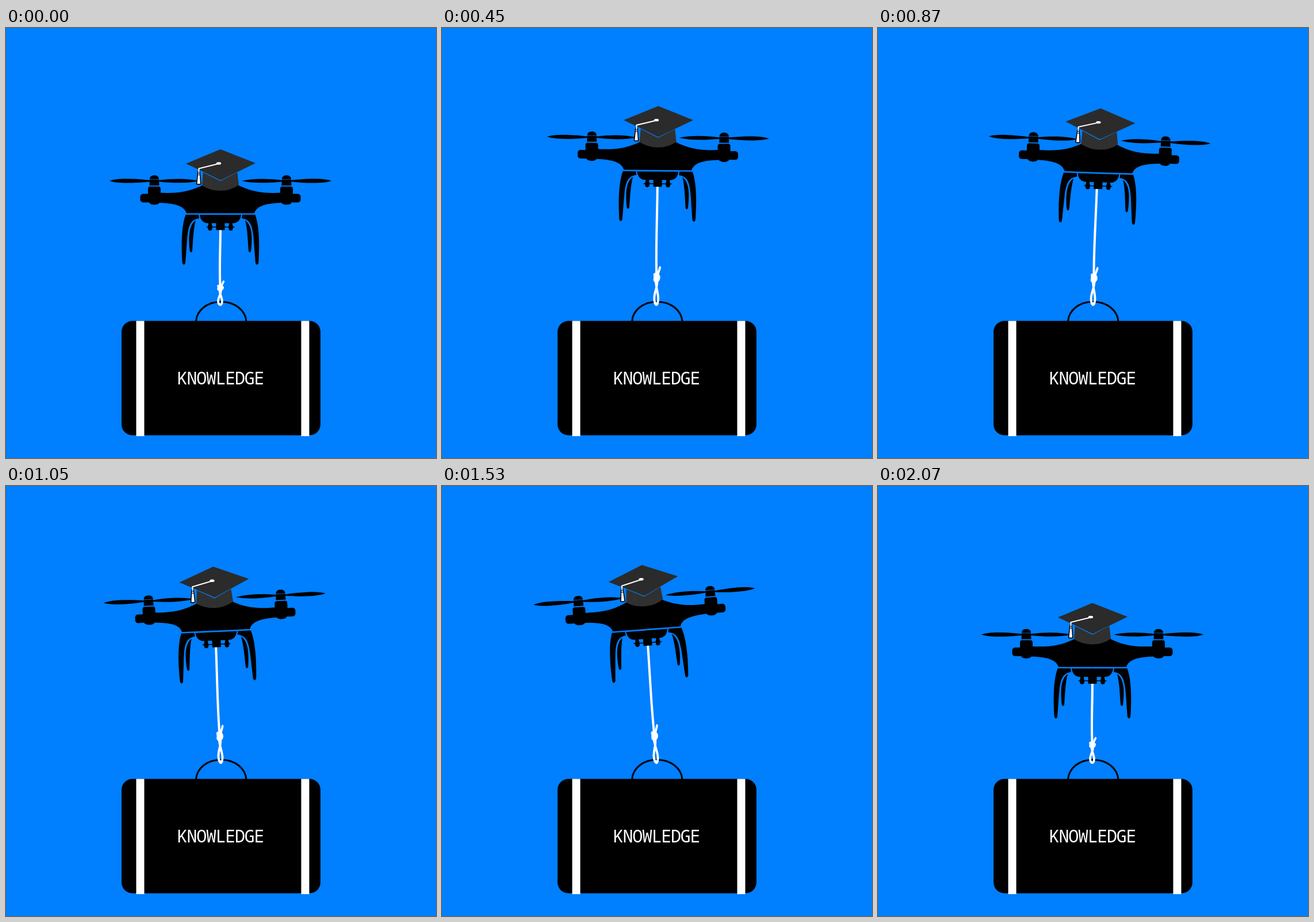
These frames come from a looping animation (748x748 px, 2.1 s). An HTML page:

```html
<!DOCTYPE html>
<html lang="en">
<head>
<meta charset="utf-8">
<title>Knowledge drone</title>
<style>
  html, body { margin: 0; width: 100%; height: 100%; overflow: hidden; background: #007fff; }
  svg { display: block; width: 100vw; height: 100vh; }
  text { font: 500 30px "Noto Sans Mono", "DejaVu Sans Mono", monospace; letter-spacing: -1.3px; }
</style>
</head>
<body>
<svg viewBox="0 0 748 748">
  <defs>
    <g id="half">
      <!-- propeller and motor -->
      <path d="M180 266C192 261.500 214 261.200 251 264.800L265 264.800C295 261.200 318 261.800 336 266C318 270 295 270.300 265 267.200L251 267.200C214 271 192 270 180 266Z"/>
      <path d="M250 262C250.500 258 254 256.200 258 256.200S265.500 258 266 262L266.500 274H249.500Z"/>
      <path d="M250.500 275.800H265.500Q269 276 269 280V300Q267 307.500 258 307.500T247 300V280Q247 276 250.500 275.800Z"/>
      <path d="M250 263.300H266" stroke="#007fff" stroke-width=".7"/>
      <rect x="233.500" y="288.500" width="18" height="15" rx="5"/>
      <!-- arm and body -->
      <path d="M266 286.500C298 288 318 285.500 343 273L374 262V322.300H314C310 309 293 305 266 304Z"/>
      <!-- legs -->
      <path d="M312.500 324.800H335L336 331C321 333 317.500 344 315.500 363C314 381 313 397 312 409Q309.500 414.500 306.800 409C305 383 304.500 346 312.500 324.800Z"/>
      <path d="M330 334.500C326 349 325.500 368 324 388Q322 392.500 319.800 388C317 363 318 343 330 334.500Z"/>
      <!-- camera mount -->
      <path d="M337 325H374V339.500H349C341 338 338 332 337 325Z"/>
      <path d="M352 338H358V342.500Q359 343.500 359 345.500H374V347H359Q359 352.500 355 352.500T351 347H348.500V345.500H351Q351 343.500 352 342.500Z"/>
    </g>
  </defs>

  <rect width="748" height="748" fill="#007fff"/>

  <rect x="201" y="509.500" width="346" height="199" rx="19"/>
  <path d="M330.500 512C331 491 350 476.300 374 476.300S417.500 491 418 512" fill="none" stroke="#000" stroke-width="3"/>
  <path d="M226.500 509.500h14v200.500h-14zM513.500 509.500h14v200.500h-14z" fill="#fff"/>
  <text x="373" y="620" text-anchor="middle" fill="#fff">KNOWLEDGE</text>

  <g id="rope" fill="none" stroke="#fff" stroke-width="4" stroke-linecap="round" stroke-linejoin="round">
    <path d="M373 346C373 385 371 415 372.500 446"/>
    <path d="M374.500 449L378.500 441" stroke-width="3.600"/>
    <path d="M368.500 448.500Q373 446 377.500 450.500Q379 454 373 456.500Q367 456 369 452Z" fill="#fff" stroke-width="2.600"/>
    <path d="M371.500 456C372 464 376 469 376 476Q375.500 481.500 372.500 481.500Q369.200 480.500 369 475C369 468 374 464 374 456" stroke-width="3.800"/>
  </g>

  <g id="drone">
    <use href="#half"/>
    <use href="#half" transform="matrix(-1 0 0 1 746 0)"/>
    <rect x="365.500" y="337" width="15" height="14.500" rx="1"/>
    <path d="M343 248L341 274Q355 283 373 283T405 273L402 248L373 262Z" fill="#303030"/>
    <path d="M342 250L373 265.500L403 250" fill="none" stroke="#007fff" stroke-width="1.300"/>
    <path d="M373 211L434 235L374 264.500L313 236Z" fill="#2b2b2b"/>
    <path d="M335.500 250L333 270.500H337.500Z" stroke="#000" stroke-width="4.500" stroke-linejoin="round"/>
    <path d="M370 236L335.500 244.500V252" fill="none" stroke="#fff" stroke-width="2"/>
    <path d="M334.300 253H336.700L338 271H332.500Z" fill="#fff"/>
    <path d="M333 255.500H338" stroke="#000"/>
    <ellipse cx="370" cy="235.500" rx="4.200" ry="2.200" fill="#fff"/>
  </g>
</svg>
<script>
  const LOOP = 2100, STEP = 30;
  const PIVOT = { x: 373, y: 478 };
  const ROPE_END = 483, ROPE_LENGTH = 132;

  // [time in ms, value] pairs, joined by straight lines
  const lift = [[0, 0], [300, 75.5], [436, 75.5], [630, 72.5], [1020, 70.8], [1260, 73.3], [1800, 75.5], [LOOP, 0]];
  const tilt = [[0, 0], [436, 0], [630, 6.6], [963, 0], [1260, -8.5], [1800, 0], [LOOP, 0]];
  const drift = [[0, 0], [436, 0], [630, 5], [1350, 0], [LOOP, 0]];

  const drone = document.getElementById("drone");
  const rope = document.getElementById("rope");

  function valueAt(keys, t) {
    const i = keys.findIndex(key => key[0] > t);
    const [t0, v0] = keys[i - 1], [t1, v1] = keys[i];
    return v0 + (v1 - v0) * (t - t0) / (t1 - t0);
  }

  function draw(t) {
    const up = valueAt(lift, t), angle = valueAt(tilt, t), shift = valueAt(drift, t);
    const swing = `rotate(${angle} ${PIVOT.x} ${PIVOT.y})`;
    const stretch = (ROPE_LENGTH + up) / ROPE_LENGTH;
    drone.setAttribute("transform", `translate(${shift} 0) ${swing} translate(0 ${-up})`);
    rope.setAttribute("transform",
      `translate(${shift * 0.4} 0) ${swing} translate(0 ${ROPE_END}) scale(1 ${stretch}) translate(0 ${-ROPE_END})`);
  }

  const start = performance.now();
  function tick() {
    const elapsed = (performance.now() - start) % LOOP;
    draw(Math.floor(elapsed / STEP) * STEP);
    requestAnimationFrame(tick);
  }
  tick();
</script>
</body>
</html>
```
